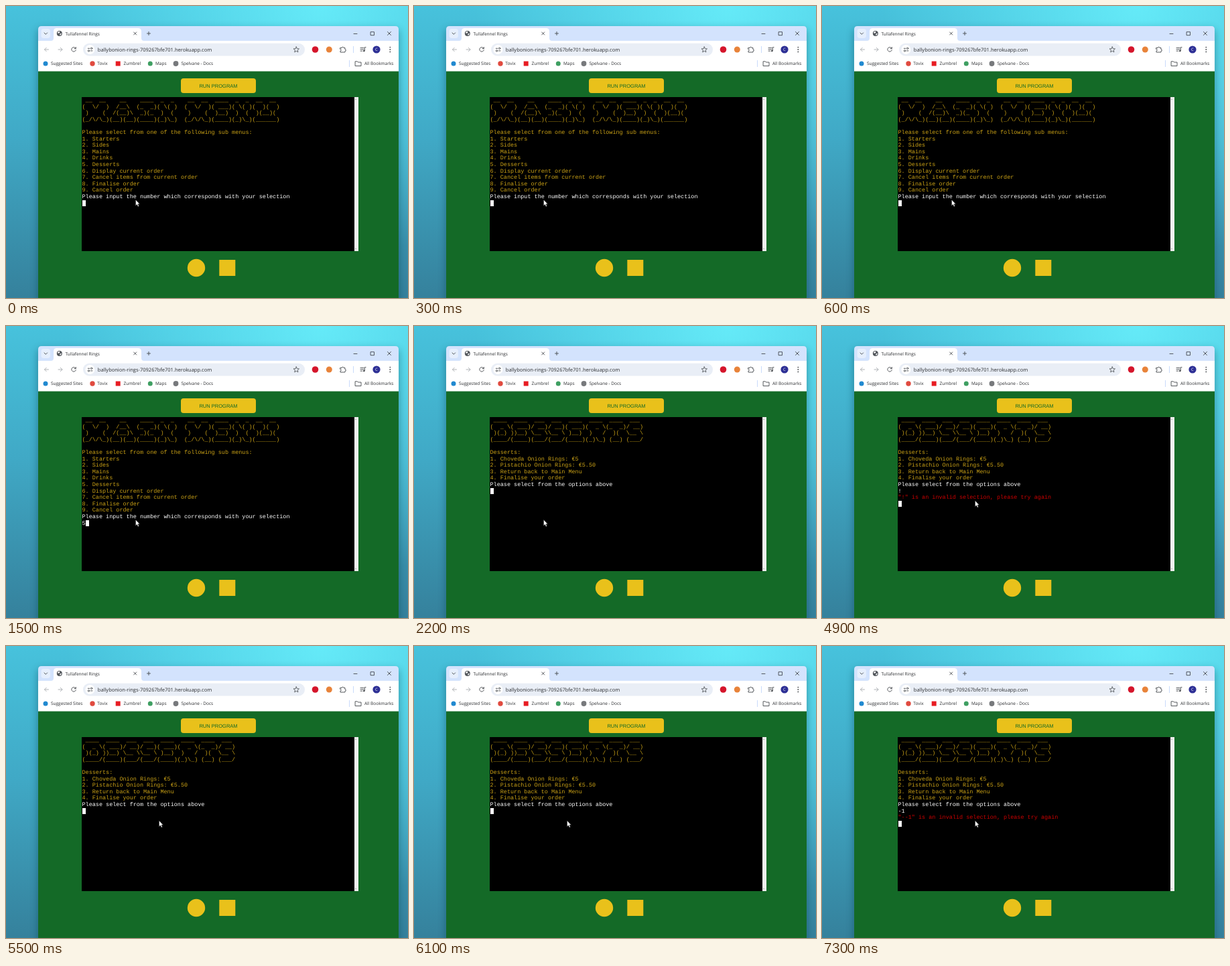
Animation, 600 px wide and 436 px high, one loop 8000 ms. Source, as an HTML page:

```html
<!DOCTYPE html>
<html lang="en">
<head>
<meta charset="utf-8">
<title>Terminal menu</title>
<style>
  html, body { margin: 0; width: 100%; height: 100%; overflow: hidden; }
  #stage { position: relative; width: 600px; height: 436px; overflow: hidden; }
  svg { position: absolute; left: 0; top: 0; }
  svg text { font-family: "Open Sans", "Noto Sans", sans-serif; fill: #2b2d30; text-rendering: geometricPrecision; }
  .small { font-size: 6.5px; }
  .line { fill: none; stroke: #45484c; stroke-width: .9; stroke-linecap: round; stroke-linejoin: round; }
  .faint { stroke: #a9acb0; }
  #term { position: absolute; left: 113px; top: 136px; width: 413px; height: 230px; background: #000; overflow: hidden; }
  #term pre { margin: 0; padding: 1px 0 0 .5px; font: 8.475px/9.6px "Liberation Mono", "Courier New", monospace; color: #cca316; text-rendering: geometricPrecision; }
  #term .in { color: #fff; }
  #term .err { color: #cc0000; }
  #caret { position: absolute; width: 5px; height: 9.6px; background: #fff; }
  #bar { position: absolute; right: 0; top: 0; width: 6px; height: 100%; background: #f1f1f1; }
  #bar::before, #bar::after { content: ""; position: absolute; left: 1.4px; border: 1.5px solid transparent; }
  #bar::before { top: 2px; border-bottom-color: #777; }
  #bar::after { bottom: 2px; border-top-color: #777; }
  #mouse { width: 8px; height: 12px; overflow: visible; }
</style>
</head>
<body>
<div id="stage">
  <svg width="600" height="436" viewBox="0 0 600 436">
    <defs>
      <linearGradient id="sky" x1="0" y1="0" x2="0" y2="1">
        <stop offset="0" stop-color="#47c2dc"/>
        <stop offset=".45" stop-color="#40a9c6"/>
        <stop offset="1" stop-color="#35819c"/>
      </linearGradient>
      <radialGradient id="glow" gradientUnits="userSpaceOnUse" cx="470" cy="0" r="380">
        <stop offset="0" stop-color="#6cf4ff" stop-opacity=".8"/>
        <stop offset="1" stop-color="#6cf4ff" stop-opacity="0"/>
      </radialGradient>
      <filter id="shade" x="-10%" y="-10%" width="120%" height="120%"><feGaussianBlur stdDeviation="6"/></filter>
    </defs>
    <rect width="600" height="436" fill="url(#sky)"/>
    <rect width="600" height="436" fill="url(#glow)"/>
    <rect x="47" y="34" width="540" height="420" rx="6" fill="#0b3a4c" opacity=".4" filter="url(#shade)"/>

    <!-- window -->
    <path d="M48 436V35q0-5 5-5H581q5 0 5 5V436z" fill="#d3e3fd"/>
    <rect x="48" y="52" width="538" height="46" fill="#fff"/>
    <path d="M67 52q4 0 4-4V38q0-5 5-5H197q5 0 5 5V48q0 4 4 4z" fill="#fff"/>
    <rect x="52.5" y="34" width="13.5" height="14" rx="4" fill="#e6effd"/>
    <path class="line" d="M57 40l2.300 2.300L61.600 40M190.700 39l4 4m0-4l-4 4M519 41.500h5M544.500 38.700h5v5h-5zM569.500 38.500l5 5m0-5l-5 5M210.500 41h5m-2.500-2.500v5"/>
    <circle cx="79.800" cy="41" r="4" fill="#53575c"/>
    <path d="M77 39l2.500-1.200 1 1.500-1.500 1.500-1.600-.2zM80.500 41.500l2.300-.8-.7 2.400-1.700 1z" fill="#fff"/>
    <text class="small" x="88.600" y="43.500">Tullafennel Rings</text>

    <!-- toolbar -->
    <path class="line faint" d="M63.500 65H57.500m2.800-2.800L57.500 65l2.800 2.800M78 65h6m-2.800-2.800L84 65l-2.800 2.800"/>
    <path class="line" d="M104 63.200a3.300 3.300 0 1 0 .3 2.600M104.300 61.500v2.200h-2.200"/>
    <rect x="115" y="55.800" width="331" height="18.600" rx="9.300" fill="#e9eef6"/>
    <circle cx="125.400" cy="65" r="7" fill="#fff"/>
    <path class="line" d="M122.300 63.300h2.500M126.500 66.900h2.500"/>
    <circle class="line" cx="127.600" cy="63.300" r="1.200"/>
    <circle class="line" cx="123.500" cy="66.900" r="1.200"/>
    <text x="136.800" y="67.700" font-size="7.5">ballybonion-rings-709267bfe701.herokuapp.com</text>
    <path class="line" style="stroke-width:.8" d="M433.300 60.900l1.200 2.800 3 .2-2.300 2 .7 3-2.600-1.600-2.600 1.600.7-3-2.300-2 3-.2z"/>
    <circle cx="461.500" cy="65" r="4.800" fill="#d5152b"/>
    <circle cx="482.300" cy="65" r="4.500" fill="#e8833a"/>
    <path class="line" d="M499 62.500h2.400a1.300 1.300 0 0 1 2.600 0h2v2.300a1.300 1.300 0 0 1 0 2.600V69H499v-2a1.300 1.300 0 0 0 0-2.600z"/>
    <path d="M518.500 60v10" stroke="#c9dafa"/>
    <path class="line" d="M529 62.300h5M529 64.700h5M529 67.100h2.800M535.300 66.700v-5h1.800"/>
    <circle cx="534.300" cy="67" r="1.300" fill="#45484c"/>
    <circle cx="553" cy="65" r="5.600" fill="#2d2f95"/>
    <text x="553" y="67.100" font-size="6" text-anchor="middle" style="fill:#fff">C</text>
    <g fill="#45484c"><circle cx="573.300" cy="61.600" r=".9"/><circle cx="573.300" cy="65" r=".9"/><circle cx="573.300" cy="68.400" r=".9"/></g>

    <!-- bookmarks -->
    <circle cx="59" cy="86" r="3.500" fill="#2189d0"/>
    <circle cx="129" cy="86" r="3.700" fill="#e04a3f"/>
    <rect x="163.700" y="82.500" width="7" height="7" fill="#e81c23"/>
    <circle cx="215.300" cy="86" r="3.500" fill="#3f9f62"/>
    <circle cx="253.500" cy="86" r="3.900" fill="#77797c"/>
    <g class="small">
      <text x="67" y="88.400">Suggested Sites</text>
      <text x="136.300" y="88.400">Tovix</text>
      <text x="175.500" y="88.400">Zumbrel</text>
      <text x="223" y="88.400">Maps</text>
      <text x="261.500" y="88.400">Spelvane - Docs</text>
      <text x="535" y="88.400">All Bookmarks</text>
    </g>
    <path d="M512.500 81v10" stroke="#c9dafa"/>
    <path class="line" d="M521.500 82.800h3l1 1.200h4.500v5.500h-8.500z"/>

    <!-- page -->
    <rect x="48" y="97.500" width="538" height="338.500" fill="#146a27"/>
    <rect x="261" y="108" width="112" height="22" rx="4" fill="#e9c11b"/>
    <text x="317" y="121.800" font-size="7.530" text-anchor="middle" style="font-family:'Liberation Sans',Arial,sans-serif;fill:#146a27">RUN PROGRAM</text>
    <circle cx="284" cy="391" r="13.200" fill="#e9c11b"/>
    <rect x="318.300" y="379" width="24" height="24" fill="#e9c11b"/>
  </svg>

  <div id="term"><pre id="out"></pre><div id="caret"></div><div id="bar"></div></div>
  <svg id="mouse" viewBox="0 0 8 12"><path d="M.5.300V9.200L2.500 7.300 3.900 10.500 5.400 9.800 4 6.700H6.600z" fill="#fff" stroke="#222" stroke-width=".5"/></svg>
</div>

<script>
const LOOP = 8000, COL = 5.085, ROW = 9.6;

const mainMenu = String.raw` __  __    __    ____  _  _    __  __  ____  _  _  __  __
(  \/  )  /__\  (_  _)( \( )  (  \/  )( ___)( \( )(  )(  )
 )    (  /(__)\  _)(_  )  (    )    (  )__)  )  (  )(__)(
(_/\/\_)(__)(__)(____)(_)\_)  (_/\/\_)(____)(_)\_)(______)

Please select from one of the following sub menus:
1. Starters
2. Sides
3. Mains
4. Drinks
5. Desserts
6. Display current order
7. Cancel items from current order
8. Finalise order
9. Cancel order`;

const desserts = String.raw` ____  ____  ___  ___  ____  ____  ____  ___
(  _ \( ___)/ __)/ __)( ___)(  _ \(_  _)/ __)
 )(_) ))__) \__ \\__ \ )__)  )   /  )(  \__ \
(____/(____)(___/(___/(____)(_)\_) (__) (___/

Desserts:
1. Choveda Onion Rings: €5
2. Pistachio Onion Rings: €5.50
3. Return back to Main Menu
4. Finalise your order`;

const screens = [
  { body: mainMenu, ask: "Please input the number which corresponds with your selection" },
  { body: desserts, ask: "Please select from the options above" }
];

// time, screen, typed text, rejected value
const steps = [
  [0, 0, "", ""],
  [1400, 0, "5", ""],
  [2000, 1, "", ""],
  [3600, 1, "!", ""],
  [3700, 1, "!", "!"],
  [5500, 1, "", ""],
  [7000, 1, "-", ""],
  [7100, 1, "-1", ""],
  [7200, 1, "-1", "--1"]
];

// time, x, y of the pointer tip
const moves = [[0, 193, 289], [3000, 211, 275], [3100, 228, 260.5]];

const $ = id => document.getElementById(id);
const at = (table, t) => table.filter(row => row[0] <= t).pop();
const span = (cls, text) => `<span class="${cls}">${text}</span>`;
let shown;

function drawTerminal([, id, typed, bad]) {
  const { body, ask } = screens[id];
  const error = bad && "\n" + span("err", `"${bad}" is an invalid selection, please try again`);
  $("out").innerHTML = body + "\n" + span("in", ask + "\n" + typed) + error;
  const row = body.split("\n").length + 1 + (bad ? 2 : 0);
  $("caret").style.left = .5 + (bad ? 0 : typed.length * COL) + "px";
  $("caret").style.top = row * ROW + "px";
}

function frame() {
  const t = performance.now() % LOOP;
  const step = at(steps, t);
  if (step !== shown) drawTerminal(shown = step);
  const [, x, y] = at(moves, t);
  $("mouse").style.transform = `translate(${x}px, ${y}px)`;
  requestAnimationFrame(frame);
}
frame();
</script>
</body>
</html>
```
